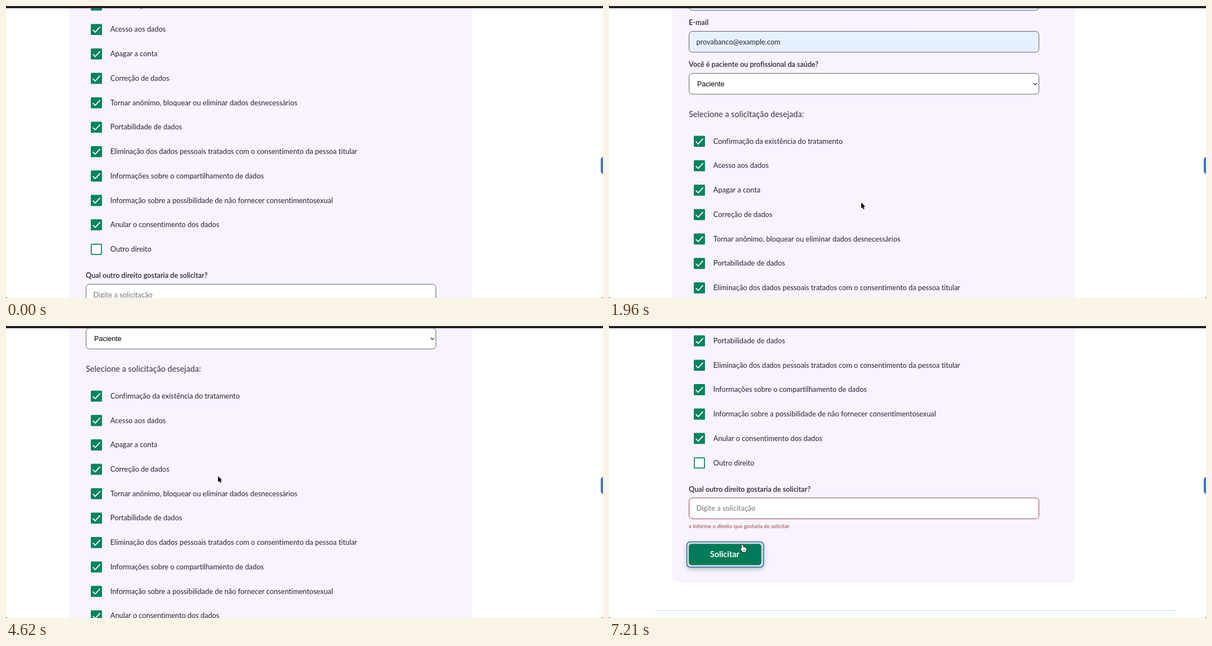
Recreate the animation shown at these times as an HTML page with a canvas. Size 1070 by 523 pixels, loop 8000 ms.

```html
<!DOCTYPE html>
<html lang="pt-BR">
<head>
<meta charset="utf-8">
<title>Solicitação de direitos</title>
<style>
  html, body { margin: 0; width: 100%; height: 100%; overflow: hidden; background: #fff; }
  canvas { display: block; width: 1070px; height: 523px; }
</style>
</head>
<body>
<canvas id="stage" width="1070" height="523"></canvas>
<script>
const ctx = document.getElementById('stage').getContext('2d');
const W = 1070, H = 523, LOOP = 8000, STEP = 70;
const GREEN = '#00845e', INK = '#27242b', BORDER = '#626066', RED = '#96443a';
const SANS = 'Lato, "Open Sans", sans-serif';
const BODY = `12.85px ${SANS}`;
const LABEL = `600 12.7px ${SANS}`;
const ARIAL = '"Liberation Sans", Arial, sans-serif';

const ROWS = [
  'Confirmação da existência do tratamento',
  'Acesso aos dados',
  'Apagar a conta',
  'Correção de dados',
  'Tornar anônimo, bloquear ou eliminar dados desnecessários',
  'Portabilidade de dados',
  'Eliminação dos dados pessoais tratados com o consentimento da pessoa titular',
  'Informações sobre o compartilhamento de dados',
  'Informação sobre a possibilidade de não fornecer consentimentosexual',
  'Anular o consentimento dos dados',
  'Outro direito'
];
const ROW_Y = 343.3, PITCH = 43.73;
const BUTTON_Y = 925.7, ERROR_H = 19.5;
const POINTER_IN = 350, CLICK = 7070;

const clamp = u => Math.min(1, Math.max(0, u));

// Quick start, long tail, like a wheel scroll
function glide(t, from, to) {
  const rest = (1 - clamp((t - from) / (to - from))) ** 1.5;
  return 1 - rest * rest * (3 - 2 * rest);
}

const scrollAt = t => 345
  - 218.6 * glide(t, 630, 1540)
  - 129.3 * glide(t, 1820, 2520)
  + 64.4 * glide(t, 3640, 4060)
  + 219.2 * glide(t, 4200, 5040)
  + 204 * glide(t, 5040, 5530)
  + 50.8 * glide(t, 5670, 5950);

function pointerAt(t) {
  const enter = glide(t, 350, 420), up = glide(t, 3220, 3500), down = glide(t, 6020, 6790);
  return {
    x: 466 - 14 * enter - 72 * up - 141 * down,
    y: 415 - 63 * enter - 83 * up + 123 * down
  };
}

function text(str, x, y, font, color = INK) {
  ctx.font = font;
  ctx.fillStyle = color;
  ctx.fillText(str, x, y);
}

function box(x, y, w, h, r, fill, stroke, line = 1) {
  ctx.beginPath();
  ctx.roundRect(x, y, w, h, r);
  if (fill) { ctx.fillStyle = fill; ctx.fill(); }
  if (stroke) { ctx.strokeStyle = stroke; ctx.lineWidth = line; ctx.stroke(); }
}

function polyline(points, color, width) {
  ctx.beginPath();
  points.forEach(([x, y]) => ctx.lineTo(x, y));
  ctx.strokeStyle = color;
  ctx.lineWidth = width;
  ctx.stroke();
}

function field(title, y, value, fill, { font = BODY, x = 156.5, color = INK, border = BORDER } = {}) {
  text(title, 143, y - 11.4, LABEL);
  box(143.5, y, 627, 37.4, 6, fill, border);
  text(value, x, y + 23.2, font, color);
}

function checkbox(y, checked) {
  if (!checked) {
    box(152.9, y - 8.9, 18.2, 18.2, 1, '#fff', GREEN, 1.7);
    return;
  }
  box(152, y - 9.8, 20, 19.8, 1.5, GREEN);
  polyline([[155.7, y + .6], [159.9, y + 4.8], [168.6, y - 4.6]], '#fff', 1.8);
}

function button(y, hover, focused) {
  ctx.save();
  ctx.shadowColor = 'rgba(0,60,60,.32)';
  ctx.shadowBlur = hover ? 9 : 6;
  ctx.shadowOffsetY = hover ? 3 : 2;
  if (focused) box(139.5, y - 3.8, 137.5, 45.5, 6, '#d2dce8');
  else box(143, y, 130, 38, 5, GREEN);
  ctx.restore();
  if (focused) box(139.5, y - 3.8, 137.5, 45.5, 6, null, '#2d6c98', 1.5);
  box(143, y, 130, 38, 5, hover ? '#007a58' : GREEN);
  text('Solicitar', 181, y + 23.6, `bold 14.6px ${SANS}`, '#fff');
}

const ARROW = new Path2D('M0 0V10.6L2.4 8.4 4 12.2 5.8 11.4 4.2 7.7H7.5Z');
const HAND = new Path2D('M-1.2 7.2V1Q-1 -.4 .2 -.3 1.3 -.2 1.4 1V4.4Q2.6 3.6 3.6 4.7 4.8 4.2 5.6 5.2 7 5 7.1 6.4V8.6Q7 10.6 6 12.8H.6Q-.8 10.6 -3 8.2 -3.6 7 -2.6 6.6 -1.8 6.5 -1.2 7.2Z');

function pointer({ x, y }, hover) {
  const shape = hover ? HAND : ARROW;
  ctx.save();
  ctx.translate(x, y);
  ctx.strokeStyle = hover ? '#111' : '#fff';
  ctx.lineWidth = 1.6;
  ctx.stroke(shape);
  ctx.fillStyle = hover ? '#fff' : '#000';
  ctx.fill(shape);
  if (hover) for (const dx of [2.2, 4.2]) polyline([[dx, 8], [dx, 11]], '#111', .7);
  ctx.restore();
}

function form(hover, error) {
  const shift = error ? 0 : -ERROR_H;
  box(113, 15.5, 722, 979 + shift, 8, '#f8f3ff');

  field('Nome', 71.4, 'Teste', '#e6f0fe');
  field('E-mail', 146.4, 'provabanco@example.com', '#e6f0fe');
  field('Você é paciente ou profissional da saúde?', 221.6, 'Paciente', '#fff',
    { font: `12.6px ${ARIAL}`, x: 158, color: '#000' });
  polyline([[761, 239], [764.2, 242.2], [767.4, 239]], '#222', 1.2);
  text('Selecione a solicitação desejada:', 143, 299.8, `500 14.5px ${SANS}`, '#454249');

  ROWS.forEach((row, i) => {
    const y = ROW_Y + i * PITCH;
    checkbox(y, i < ROWS.length - 1);
    text(row, 187, y + 4.4, BODY);
  });

  field('Qual outro direito gostaria de solicitar?', 843.4, 'Digite a solicitação', '#fff',
    { color: '#77747a', border: error ? RED : BORDER });
  if (error) text('x Informe o direito que gostaria de solicitar', 143, 897, `9.6px ${SANS}`, RED);
  button(BUTTON_Y + shift, hover, error);

  ctx.fillStyle = '#bfe3d8';
  ctx.fillRect(82, 1044.5 + shift, 934, 1);
}

function frame() {
  box(1066.5, 270.5, 12, 30, 5, '#4078c0', '#2f60a8');
  ctx.fillStyle = '#231f25';
  ctx.fillRect(0, 0, W, 4);
  for (const [x, dir] of [[0, 1], [W, -1]]) {
    ctx.beginPath();
    ctx.moveTo(x, H - 2);
    ctx.lineTo(x + 2 * dir, H);
    ctx.lineTo(x, H);
    ctx.fill();
  }
}

function draw(time) {
  const t = Math.floor((time % LOOP) / STEP + 1e-6) * STEP;
  const scroll = scrollAt(t), tip = pointerAt(t);
  const error = t >= CLICK;
  const top = BUTTON_Y - scroll - (error ? 0 : ERROR_H);
  const hover = tip.x > 143 && tip.x < 273 && tip.y > top && tip.y < top + 38;

  ctx.fillStyle = '#fff';
  ctx.fillRect(0, 0, W, H);
  ctx.save();
  ctx.translate(0, -scroll);
  form(hover, error);
  ctx.restore();
  frame();
  if (t >= POINTER_IN) pointer(tip, hover);
}

ctx.letterSpacing = '0.01px'; // keeps letters from joining into ligatures
const start = performance.now();
function tick() {
  draw(performance.now() - start);
  requestAnimationFrame(tick);
}
tick();
</script>
</body>
</html>
```
